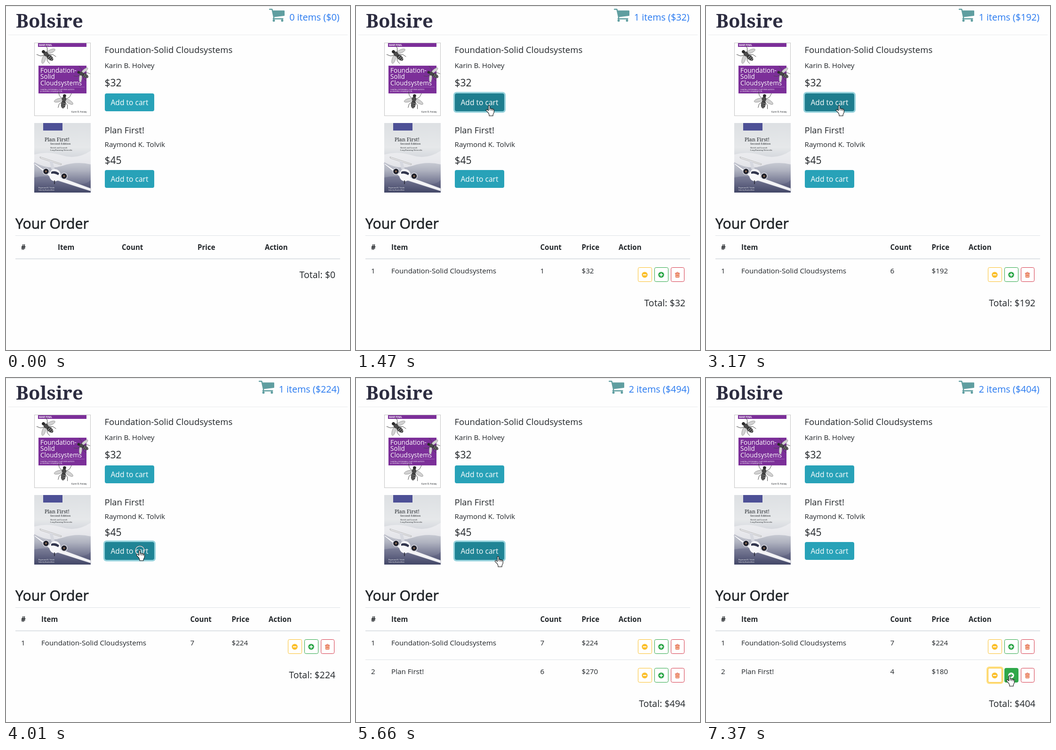
These frames come from a looping animation (731 px wide and 732 px high, 8 s). An HTML page:

```html
<!DOCTYPE html>
<html lang="en">
<head>
<meta charset="utf-8">
<style>
  html, body { margin: 0; width: 100%; height: 100%; overflow: hidden; background: #fff; }
  svg { display: block; width: 731px; height: 732px; }
  text { font: 15.2px "Open Sans", "Noto Sans", sans-serif; fill: #212529; white-space: pre; }
  .brand { font: bold 40px "Noto Serif", serif; fill: #2c2c40; }
  .title { font-size: 18.5px; }
  .price { font-size: 21px; }
  .btn { font-size: 15.6px; fill: #fff; text-anchor: middle; }
  .head { font-size: 30.3px; stroke: #212529; stroke-width: .7px; }
  .th { font-weight: bold; font-size: 15.1px; }
  .sum { font-size: 19.5px; text-anchor: end; }
  .link { font-size: 19.7px; fill: #2779f0; text-anchor: end; }
  .cover { fill: #fff; font-size: 13.6px; }
  .tiny { font-size: 4px; fill: #fff; }
  .serif { font-family: "Noto Serif", serif; }
</style>
</head>
<body>
<svg viewBox="0 0 731 732">
  <defs>
    <linearGradient id="sky" x1="0" y1="0" x2="0" y2="1">
      <stop offset="0" stop-color="#dde0e3"/>
      <stop offset=".35" stop-color="#e6e8ea"/>
      <stop offset=".52" stop-color="#d2d5db"/>
      <stop offset=".68" stop-color="#b0b3c0"/>
      <stop offset=".85" stop-color="#777a94"/>
      <stop offset="1" stop-color="#3d4261"/>
    </linearGradient>
    <g id="bee">
      <path d="M-4-3L-11-9L-14-17M4-3L11-9L14-17M-4 0L-13-1L-17 5M4 0L13-1L17 5M-3 3L-9 9L-10 17M3 3L9 9L10 17" fill="none" stroke="#444" stroke-width=".9"/>
      <g fill="#d2d2d2" stroke="#777" stroke-width=".6">
        <ellipse cx="-11" cy="1" rx="10" ry="3.6" transform="rotate(-24 -11 1)"/>
        <ellipse cx="11" cy="1" rx="10" ry="3.6" transform="rotate(24 11 1)"/>
      </g>
      <ellipse cy="8" rx="5" ry="9" fill="#3a3a3a"/>
      <path d="M-4.500 6H4.500M-4.500 10H4.500M-3 14H3" stroke="#aaa" stroke-width="1"/>
      <circle cy="-3" r="5" fill="#4a4a4a"/>
      <circle cy="-10" r="3.400" fill="#2b2b2b"/>
    </g>
  </defs>

  <rect width="731" height="732" fill="#fefefe"/>
  <path d="M0 .5H731" stroke="#dcdddf"/>
  <path d="M5 61.500H726" stroke="#e9ebed"/>
  <text class="brand" x="21" y="46">Bolsire</text>
  <path id="cart" fill="#5f9ea0" d="M1.200 0H6.300Q7.500 0 7.800 1.600L8.200 3.800H31.800Q33 3.800 33 5V14Q33 15.200 31.800 15.400L11.200 17.800L11.500 19.200L11 20.300H29.300A1.250 1.250 0 0 1 29.300 22.800H9A1.250 1.250 0 0 1 7.800 21.200L9 18.800L5.500 2.500H1.200A1.250 1.250 0 0 1 1.200 0ZM7.600 25.300a2.500 2.500 0 1 0 5 0a2.500 2.500 0 1 0-5 0M25.400 25.300a2.500 2.500 0 1 0 5 0a2.500 2.500 0 1 0-5 0"/>
  <text class="link" id="label" x="708.500" y="31"></text>

  <!-- first cover -->
  <rect x="60.500" y="78.500" width="119" height="155" fill="#fff" stroke="#c4c4c4"/>
  <path d="M68 79H171V87H68ZM69 127H171V186H69Z" fill="#7c2f99"/>
  <text class="tiny" x="70" y="85.300" style="font-size:5.400px;font-weight:bold">MARVENIL</text>
  <text class="cover" x="73" y="142">Foundation-</text>
  <text class="cover" x="73" y="155.300">Solid</text>
  <text class="cover" x="73" y="168.500">Cloudsystems</text>
  <path d="M73 172.500H167" stroke="#b98acb" stroke-width=".6"/>
  <text class="tiny" x="73" y="178.500" style="font-size:3.500px">SHAPING DEPENDABLE PLATFORMS ACROSS</text>
  <text class="tiny" x="73" y="183" style="font-size:3.500px">A GROWING ORGANIZATION</text>
  <use href="#bee" transform="translate(87 104) rotate(-48)"/>
  <use href="#bee" transform="translate(162 145) rotate(-62) scale(.85)"/>
  <use href="#bee" transform="translate(123 201) rotate(8)"/>
  <text x="139" y="227" style="font-size:4.700px">Karin B. Holvey</text>

  <!-- second cover -->
  <rect x="60" y="249" width="120" height="148" fill="url(#sky)"/>
  <path d="M60 316Q90 308 120 318T180 308V337Q150 330 120 340T60 332Z" fill="#f0f1f3" opacity=".75"/>
  <path d="M60 365Q95 357 130 372T180 370V397H60Z" fill="#4d5273" opacity=".35"/>
  <rect x="79" y="249" width="41" height="16" fill="#4d5096"/>
  <text class="serif" x="82" y="288" style="font-size:10.800px">Plan First!</text>
  <text class="serif" x="94" y="295" style="font-size:6.100px;font-weight:500">Second Edition</text>
  <text class="serif" x="94" y="302.500" style="font-size:4px">Sketch and Launch</text>
  <text class="serif" x="94" y="307.500" style="font-size:4px">Long-Running Networks</text>
  <path d="M72 321L118 336L117 338L73 324Z" fill="#f4f4f6" stroke="#777" stroke-width=".5"/>
  <path d="M92 329L99 331L104 349H97Z" fill="#d6d8df"/>
  <path d="M60 334L98 359L94 364L60 337ZM110 362L180 388V394L108 371Z" fill="#f3f3f6" stroke="#868aa0" stroke-width=".6"/>
  <ellipse cx="104" cy="360" rx="12" ry="13" fill="#f7f7f9"/>
  <path d="M96 353Q104 349 113 356L111 360Q103 355 96 357Z" fill="#30344c"/>
  <g fill="#1d1e28" stroke="#d9dae2" stroke-width="1.500">
    <circle cx="85" cy="352" r="6.500"/><circle cx="123.500" cy="362" r="6.500"/>
  </g>
  <g fill="#8c6d55"><circle cx="85" cy="352" r="2"/><circle cx="123.500" cy="362" r="2"/></g>
  <path d="M103 371V379" stroke="#22232e" stroke-width="1.500"/>
  <text class="tiny" x="69" y="388">Raymond K. Tolvik</text>
  <text class="tiny" x="69" y="392.500" style="font-size:3px">Edited by Rosalind Meck</text>

  <text class="title" x="209.500" y="100">Foundation-Solid Cloudsystems</text>
  <text x="209.500" y="132">Karin B. Holvey</text>
  <text class="price" x="209.500" y="170.500">$32</text>
  <text class="title" x="209.500" y="271">Plan First!</text>
  <text x="209.500" y="300">Raymond K. Tolvik</text>
  <text class="price" x="209.500" y="335.500">$45</text>
  <g id="adds"></g>

  <text class="head" x="20" y="474">Your Order</text>
  <path d="M20 488.500H710" stroke="#dee2e6"/>
  <path d="M20 538H710" stroke="#dee2e6" stroke-width="2"/>
  <g id="heads"></g>
  <g id="rows"></g>
  <text class="sum" id="total" x="700"></text>

  <g id="pointer">
    <circle id="press" cx=".5" cy="1" r="9.500" fill="none" stroke="#fff" stroke-width="1.600"/>
    <circle id="pressEdge" cx=".5" cy="1" r="10.200" fill="none" stroke="#222" stroke-width=".6"/>
    <path id="arrow" fill="#fff" stroke="#111" d="M.5.5V16.500L4.300 13L6.600 18.800L9 17.800L6.600 12.200H11.500Z"/>
    <path id="hand" transform="translate(-7 0) scale(1.06)" fill="#fff" stroke="#111" stroke-linejoin="round" d="M6.600 19L5 15.500L1 11.500Q-.2 9.800 1.200 8.900Q2.400 8.400 3.600 9.600L5 11V2Q5 .6 6.400 .6T7.800 2V10V7.200Q8.200 6.200 9.400 6.400T10.800 7.800V10.500V8Q11.200 6.900 12.400 7.200T13.800 8.600V11V9Q14.400 7.900 15.400 8.300T16.300 9.800V14.500L14.200 19V21.500H6.600Z"/>
  </g>
</svg>
<script>
const $ = id => document.getElementById(id);
const LOOP = 8000;
const ITEMS = [
  { name: 'Foundation-Solid Cloudsystems', price: 32, y: 186 },
  { name: 'Plan First!', price: 45, y: 349 }
];
const ADD = ['add0', 'add1'], MINUS = 'minus1';

// [press time, release time] of every click
const CLICKS = {
  add0: [[1290, 1410], [1920, 2040], [2340, 2400], [2550, 2610], [2760, 2820], [3050, 3160], [3270, 3370]],
  add1: [[4010, 4130], [4530, 4770], [4890, 4950], [5130, 5190], [5270, 5330], [5420, 5480]],
  minus1: [[6470, 6590], [6890, 6950]]
};

// pointer path: time, x, y
const PATH = [
  [350, 378, 728], [550, 374, 640], [750, 362, 480], [950, 325, 298], [1030, 300, 233],
  [1150, 284, 214], [1210, 283, 211], [3470, 283, 211], [3850, 284, 366],
  [5600, 284, 366], [5760, 330, 400], [6200, 590, 602], [6350, 616, 632],
  [7130, 616, 632], [7370, 645, 633]
];
const ZONES = {
  add0: [210, 186, 105, 38], add1: [210, 349, 105, 38],
  minus1: [599, 617, 30, 31], plus1: [634, 617, 30, 31]
};
const LAYOUT = { empty: [32, 110, 246, 407, 550], filled: [32, 75, 391.5, 479.5, 558] };

const clamp = v => Math.max(0, Math.min(1, v));
const mix = (a, b, k) => a.map((v, i) => v + (b[i] - v) * k);
const rgb = c => `rgb(${c.map(Math.round)})`;
const text = (x, y, s, cls = '') => `<text class="${cls}" x="${x}" y="${y}">${s}</text>`;

function pointerAt(t) {
  const i = PATH.findIndex(p => p[0] > t);
  if (i < 0) return PATH[PATH.length - 1].slice(1);
  if (i === 0) return [-50, -50];
  const a = PATH[i - 1], b = PATH[i];
  return mix(a, b, (t - a[0]) / (b[0] - a[0])).slice(1);
}

const zoneAt = ([px, py]) => Object.keys(ZONES).find(id => {
  const [x, y, w, h] = ZONES[id];
  return px >= x && px < x + w && py >= y && py < y + h;
});

const released = (id, t) => CLICKS[id].filter(c => c[1] <= t).length;
const focusAt = t => Object.keys(CLICKS).filter(id => CLICKS[id][0][0] <= t).pop();

function addButton(i, t, hover, focus) {
  const id = ADD[i], y = ITEMS[i].y;
  const pressed = Math.max(...CLICKS[id].map(([a, b]) => clamp((t - a) / 150) * clamp(1 - (t - b) / 150)));
  const fill = hover === id ? mix([32, 132, 149], [31, 122, 139], pressed) : [40, 162, 184];
  const ring = focus === id
    ? `<rect x="206.800" y="${y - 3.2}" width="111.400" height="44.400" rx="7" fill="#98d3dd"/>` : '';
  return `${ring}<rect x="210" y="${y}" width="105" height="38" rx="4" fill="${rgb(fill)}"/>` +
    text(262.5, y + 25, 'Add to cart', 'btn');
}

function iconButton(x, y, w, color, active, ink, ring, icon) {
  const glow = ring
    ? `<rect x="${x - 3}" y="${y - 3}" width="${w + 6}" height="37" rx="6" fill="#ffe083"/>` : '';
  return `${glow}<rect x="${x + .5}" y="${y + .5}" width="${w - 1}" height="30" rx="3" stroke="${color}" fill="${active ? color : '#fff'}"/>` +
    `<g transform="translate(${x + w / 2 - .5} ${y + 16})">${icon(active ? ink : color, active ? color : '#fff')}</g>`;
}

const disc = d => (fg, bg) => `<circle r="6.200" fill="${fg}"/><path d="${d}" stroke="${bg}" stroke-width="2"/>`;
const minusIcon = disc('M-3.500 0H3.500');
const plusIcon = disc('M-3.500 0H3.500M0-3.500V3.500');
const trashIcon = () => `<path d="M-3.800-3V4.600Q-3.800 5.600-2.800 5.600H2.800Q3.800 5.600 3.800 4.600V-3Z" fill="#f7c9a6" stroke="#e0583c"/>
  <path d="M-5.300-3.500H5.300M-2-3.500L-1.400-5.500H1.400L2-3.500M-1.700-1V3.500M0-1V3.500M1.700-1V3.500" fill="none" stroke="#e0583c" stroke-width=".9"/>`;

function row(i, count, hover, focus) {
  const y = 538 + 61 * i, [a, b, c, d] = LAYOUT.filled, own = id => id + i;
  const line = i ? `<path d="M20 ${y + .5}H710" stroke="#dee2e6"/>` : '';
  return line + text(a, y + 31, i + 1) + text(b, y + 31, ITEMS[i].name) +
    text(c, y + 31, count) + text(d, y + 31, '$' + count * ITEMS[i].price) +
    iconButton(599, y + 18, 30, '#fbc02d', hover === own('minus'), '#212529', focus === own('minus'), minusIcon) +
    iconButton(634, y + 18, 30, '#2fa84a', hover === own('plus'), '#fff', false, plusIcon) +
    iconButton(669, y + 18, 29, '#d63a4c', false, '#fff', false, trashIcon);
}

function render(t) {
  const pos = pointerAt(t), hover = zoneAt(pos), focus = focusAt(t);
  const counts = [released('add0', t), released('add1', t) - released(MINUS, t)];
  const kinds = counts.filter(n => n > 0).length;
  const sum = counts.reduce((s, n, i) => s + n * ITEMS[i].price, 0);

  $('adds').innerHTML = ADD.map((_, i) => addButton(i, t, hover, focus)).join('');
  const cols = kinds ? LAYOUT.filled : LAYOUT.empty;
  $('heads').innerHTML = ['#', 'Item', 'Count', 'Price', 'Action']
    .map((s, i) => text(cols[i], 519, s, 'th')).join('');
  $('rows').innerHTML = counts.map((n, i) => n ? row(i, n, hover, focus) : '').join('');

  $('label').textContent = `${kinds} items ($${sum})`;
  $('cart').setAttribute('transform', `translate(${559 - 11 * (String(sum).length - 1)} 5.7)`);
  $('total').textContent = `Total: $${sum}`;
  $('total').setAttribute('y', [578.5, 638.5, 699.5][kinds]);

  const down = Object.values(CLICKS).flat().some(([a, b]) => t >= a && t < b);
  const show = (id, on) => $(id).setAttribute('visibility', on ? 'visible' : 'hidden');
  $('pointer').setAttribute('transform', `translate(${pos.map(Math.round).join(' ')})`);
  show('press', down);
  show('pressEdge', down);
  show('hand', hover);
  show('arrow', !hover);
}

const start = performance.now();
function tick() {
  render((performance.now() - start) % LOOP);
  requestAnimationFrame(tick);
}
tick();
</script>
</body>
</html>
```
